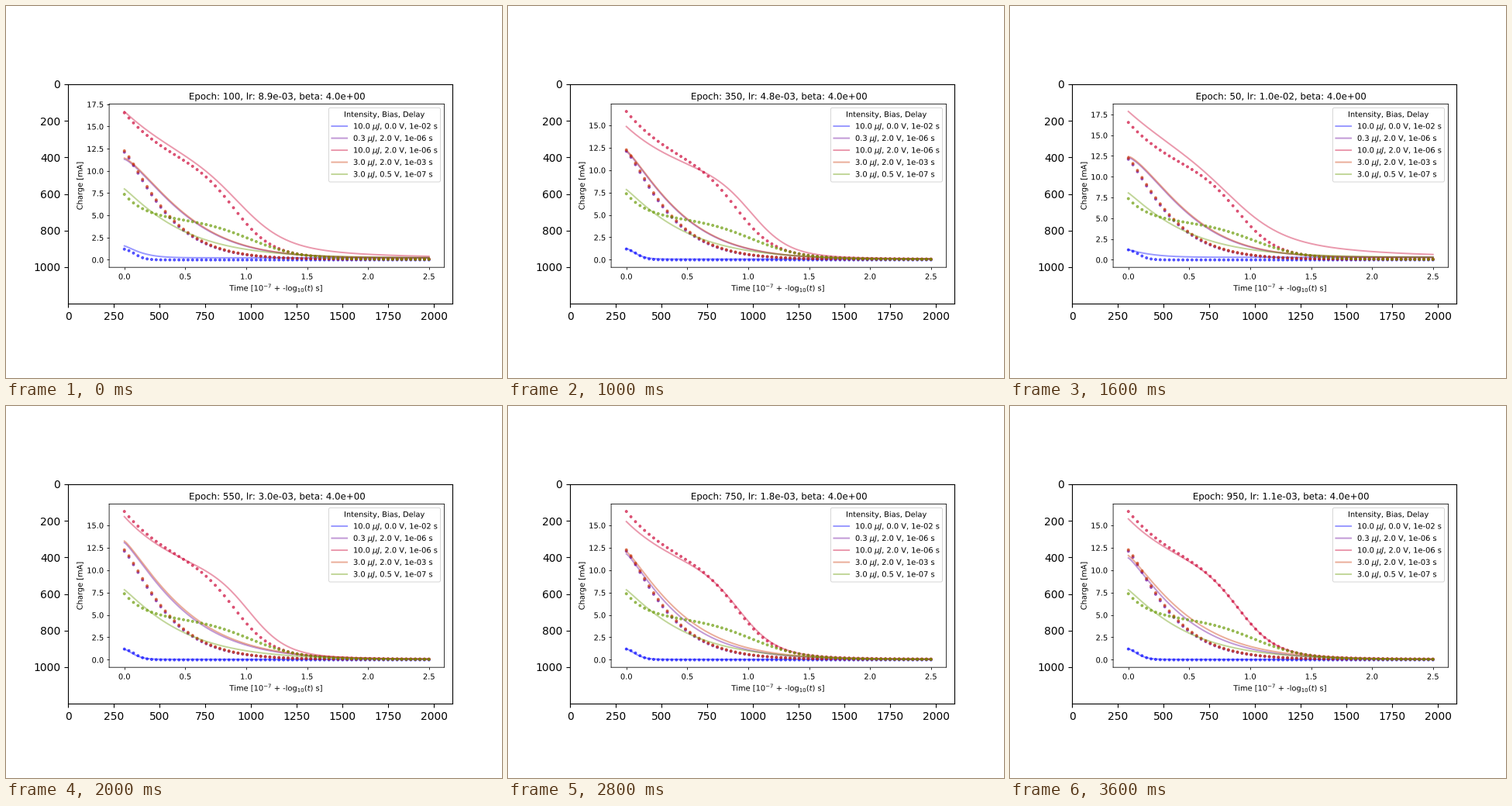
A matplotlib script for the animation above (3800 ms loop, 640 by 480 pixels).

```python
import numpy as np
import matplotlib.pyplot as plt
from matplotlib.animation import FuncAnimation
from matplotlib.lines import Line2D
from matplotlib.patches import FancyBboxPatch
from matplotlib.patheffects import Normal
from matplotlib.transforms import Affine2D

W, H = 640, 480
K = 496 / 700  # the plot is a 7 x 4 inch page shrunk into the outer axes
EM = 10 * K * 100 / 72
LEFT, RIGHT, TOP, BOTTOM = 133.1, 565.4, 126.5, 337.2
MID = (LEFT + RIGHT) / 2

# Checkpoints in text order, so 50 comes between 450 and 500
EPOCHS = sorted(range(50, 1000, 50), key=str)
EPOCHS = [e for e in EPOCHS if str(e) < "50"] + [e for e in EPOCHS if str(e) >= "50"]

# Intensity, bias and delay of each run
RUNS = [("10.0", "0.0", 2), ("0.3", "2.0", 6), ("10.0", "2.0", 6),
        ("3.0", "2.0", 3), ("3.0", "0.5", 7)]
COLORS = [plt.get_cmap("brg")(i / 5) for i in range(5)]

t = np.linspace(0, 2.5, 201)
t_dots = np.linspace(0, 2.5, 68)


def decay(t, tau, power=1):
    return np.exp(-(t / tau) ** power)


def step(t, edge, width):
    """Smooth fall from one to zero around the edge."""
    return 1 / (1 + np.exp((t - edge) / width))


# Measured charge
dots = [
    1.37 * step(t_dots, .085, .042) - .02,
    12.05 * decay(t_dots, .39, 1.22) + .05,
    7.35 * decay(t_dots, .45) + 9.15 * step(t_dots, .91, .15) + .05,
    12.2 * decay(t_dots, .396, 1.22) + .05,
    2.8 * decay(t_dots, .18) + 4.55 * step(t_dots, 1.03, .21) + .04,
]

# Key points of the training: where the fits start and bend
KEYS = [50, 100, 250, 350, 550, 750, 950]
LOW_START = [1.2, 1.55, 1.9, 1.25, 1.15, 1.2, 1.22]
MID_START = [12.3, 11.3, 12.7, 12.05, 13.05, 11.8, 11.35]
MID_TAU = [.56, .57, .54, .5, .54, .48, .51]
MID_GAP = [.007, .006, .07, .004, .015, .03, .033]
TOP_START = [17.85, 16.68, 15, 14.85, 15.95, 15.4, 15.7]
TOP_EDGE = [.85, .95, 1, 1.03, 1.03, .93, .91]


def fits(epoch):
    """Fitted charge of the five runs; early epochs are blurred and lifted."""
    low, mid, tau, gap, top, edge = (
        np.interp(epoch, KEYS, row)
        for row in (LOW_START, MID_START, MID_TAU, MID_GAP, TOP_START, TOP_EDGE))
    early = np.exp(-epoch / 100)
    floor = .04 + .36 * np.exp(-epoch / 140)
    power = 1.2 + .3 * np.exp(-epoch / 150)
    height = 8.3 + .9 * epoch / 1000
    bend = height * step(t, edge, .15 + .1 * early)
    return [
        floor + (low - floor) * decay(t, .1 + .16 * early, 1.5 - .6 * early),
        floor + (mid - floor) * decay(t, tau, power),
        floor + bend + (top - floor - bend[0]) * decay(t, .48 + .45 * early),
        floor + (mid + .1 + 5 * gap - floor) * decay(t, tau + gap, power),
        floor + 7.75 * decay(t, .51, 1.1),
    ]


fig = plt.figure(figsize=(W / 100, H / 100), dpi=100, facecolor="white")
px = Affine2D().scale(1 / W, -1 / H).translate(0, 1) + fig.transFigure
unhinted = [Normal()]


def label(x, y, text, size=10, **kw):
    return fig.text(x / W, 1 - y / H, text, fontsize=size * K,
                    path_effects=unhinted, **kw)


# Outer axes in page pixels
page = fig.add_subplot()
page.set(xlim=(-.5, 2099.5), ylim=(1199.5, -.5), aspect="equal",
         xticks=range(0, 2001, 250), yticks=range(0, 1001, 200))

# Inner plot
ax = fig.add_axes([LEFT / W, 1 - BOTTOM / H, (RIGHT - LEFT) / W, (BOTTOM - TOP) / H])
xt, yt = np.arange(0, 2.6, .5), np.arange(0, 17.6, 2.5)
ax.set_xticks(xt, [f"{v:.1f}" for v in xt])
ax.set_yticks(yt, [f"{v:.1f}" for v in yt])
ax.set_xlim(-.125, 2.625)
ax.tick_params(labelsize=10 * K, length=3.5 * K, width=.8 * K, pad=3.5 * K)
ax.tick_params(axis="x", pad=4 * K)
for text in ax.get_xticklabels() + ax.get_yticklabels():
    text.set_path_effects(unhinted)
for spine in ax.spines.values():
    spine.set(linewidth=.8 * K, snap=False)

lines = []
for color, values in zip(COLORS, dots):
    lines += ax.plot([], [], color=color, alpha=.4, lw=2 * K)
    ax.scatter(t_dots, values, s=np.full(len(t_dots), (3 * K) ** 2),
               facecolor=color, edgecolor=color, linewidths=K, alpha=.6, zorder=2)

title = label(MID, 120.6, "", 12, ha="center")
label(MID, 367.5, "Time [$10^{-7}$ + -log$_{10}$($t$) s]", ha="center")
label(95.6, (TOP + BOTTOM) / 2, "Charge [mA]", rotation=90, ha="center", va="center")

# Legend
fig.add_artist(FancyBboxPatch(
    (416.5, 131.4), 144, 95.6, boxstyle=f"round,pad=0,rounding_size={.2 * EM}",
    facecolor="white", edgecolor="0.8", linewidth=K, alpha=.8, snap=False, transform=px))
label(488.5, 143.2, "Intensity, Bias, Delay", ha="center")
for i, (energy, bias, delay) in enumerate(RUNS):
    base = 158.5 + 15.5 * i
    fig.add_artist(Line2D([420.4, 420.4 + 2 * EM], [base - .35 * EM] * 2, color=COLORS[i],
                          alpha=.4, lw=2 * K, snap=False, transform=px))
    label(448, base, rf"{energy} $\mu J$, {bias} V, 1e-{delay:02d} s")


def draw(n):
    epoch = EPOCHS[n]
    curves = fits(epoch)
    for line, y in zip(lines, curves):
        line.set_data(t, y)
    values = np.concatenate(curves + dots)
    lo, hi = values.min(), values.max()
    pad = .05 * (hi - lo)
    ax.set_ylim(lo - pad, hi + pad)
    rate = .01 * .886 ** (epoch / 50 - 1)
    title.set_text(f"Epoch: {epoch}, lr: {rate:.1e}, beta: {4:.1e}")
    return lines + [title]


anim = FuncAnimation(fig, draw, frames=len(EPOCHS), interval=200,
                     init_func=lambda: draw(0), repeat=True, repeat_delay=0)
plt.show()
```
